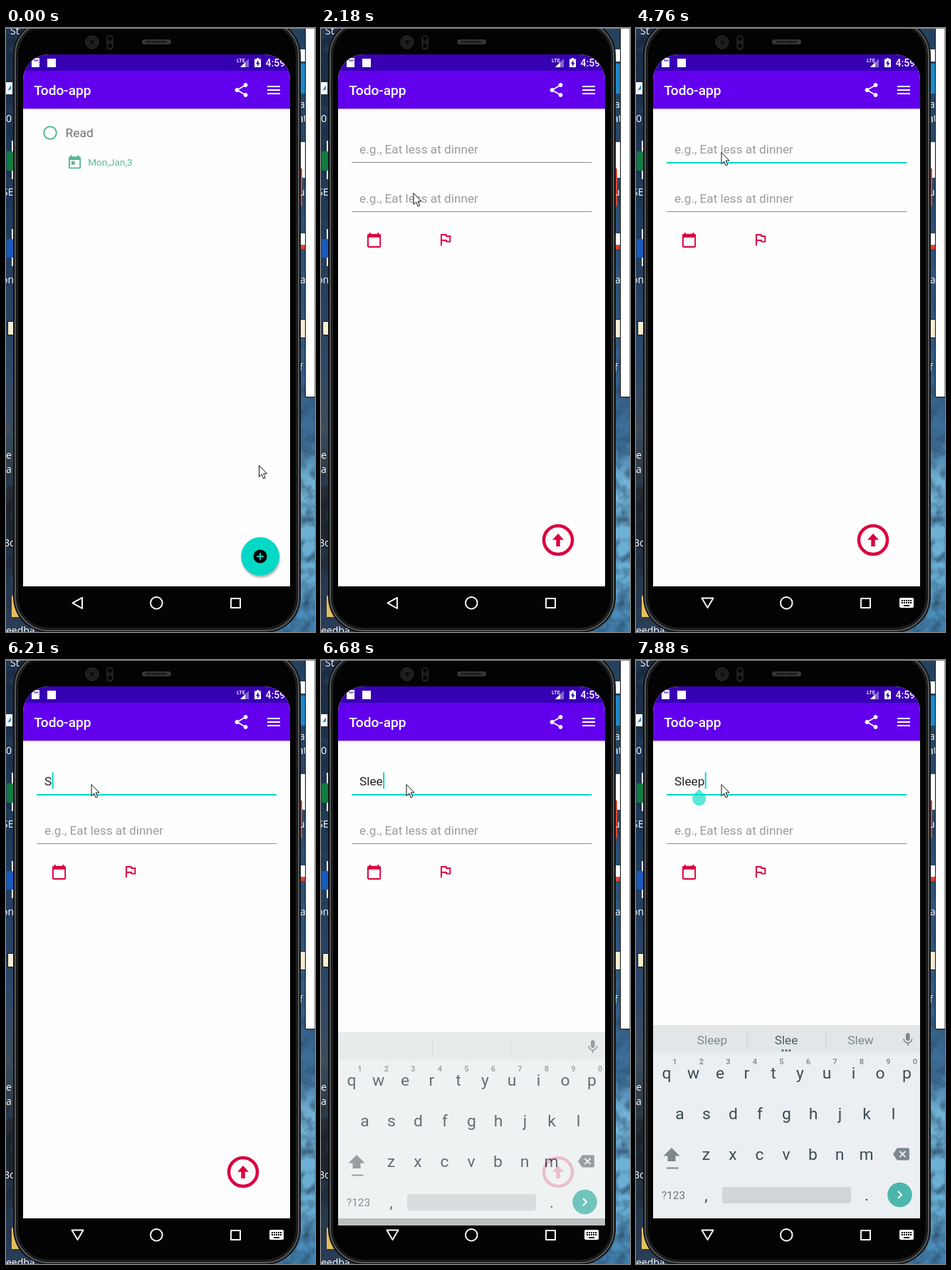
Write an HTML page that moves like this. It is 434x847 px and loops after 8 s.

```html
<!DOCTYPE html>
<html lang="en">
<head>
<meta charset="utf-8">
<title>Todo app demo</title>
<style>
  html, body { margin: 0; width: 100%; height: 100%; overflow: hidden; background: #16202c; }
  svg { display: block; font-family: Roboto, sans-serif; }
  .desk { font: 14px "Open Sans", sans-serif; fill: #fff; }
  .hint, .field { font-size: 17.2px; fill: #9b9b9b; }
  .field { fill: #222; }
  .line { fill: none; stroke: #fff; stroke-width: 1.9; stroke-linejoin: round; }
  .mid { text-anchor: middle; }
  .key { font-size: 22.9px; fill: #3c4b53; }
  .digit { font-size: 11px; font-weight: 700; fill: #87939a; }
  .word { font-size: 17.2px; fill: #7d898f; }
</style>
</head>
<body>
<svg width="434" height="847" viewBox="0 0 434 847">
  <defs>
    <linearGradient id="rock" x2="0" y2="1">
      <stop stop-color="#1a2a40"/><stop offset=".3" stop-color="#1c3555"/>
      <stop offset=".56" stop-color="#30486b"/><stop offset=".67" stop-color="#454e58"/>
      <stop offset=".8" stop-color="#1b1f26"/><stop offset="1" stop-color="#2b3d57"/>
    </linearGradient>
    <linearGradient id="sea" x2="0" y2="1">
      <stop stop-color="#23405e"/><stop offset=".6" stop-color="#35628c"/>
      <stop offset=".69" stop-color="#40749f"/><stop offset=".75" stop-color="#73b3d6"/>
      <stop offset=".9" stop-color="#68aed4"/><stop offset="1" stop-color="#3f7fae"/>
    </linearGradient>
    <linearGradient id="shade" x2="0" y2="1">
      <stop stop-color="#aaa"/><stop offset="1" stop-color="#fefefe"/>
    </linearGradient>
    <filter id="grain" x="0" y="0" width="1" height="1">
      <feTurbulence type="fractalNoise" baseFrequency=".06" numOctaves="3" seed="4"/>
      <feColorMatrix values="0 0 0 0 .02  0 0 0 0 .06  0 0 0 0 .12  1.6 0 0 0 -.6"/>
    </filter>
    <clipPath id="screen"><path d="M24 783V73a36 36 0 0 1 36-36H363a36 36 0 0 1 36 36V783z"/></clipPath>
  </defs>

  <!-- desktop -->
  <rect width="217" height="847" fill="url(#rock)"/>
  <rect x="217" width="217" height="847" fill="url(#sea)"/>
  <rect width="434" height="847" filter="url(#grain)"/>
  <path fill="#fff" d="M0 76h9v17H0zM8 158h2v54H8zM8 282h2v52H8zM412 30h9v17h-9zM412 160h9v50h-9zM412 288h9v16h-9z"/>
  <path fill="#1f88c8" d="M2 88l5-8v6zM412 50h9v42h-9z"/>
  <path fill="#107c41" d="M1 173h9v27H1z"/>
  <path fill="#185abd" d="M1 296h9v26H1z"/>
  <path fill="#e0452f" d="M412 197h4v53h-4zM412 304h9v6h-9z"/>
  <path fill="#f4edd0" stroke="#111" d="M2.500 411.500h9v19h-9zM412.500 408.500h9v26h-9z"/>
  <path fill="#e6c05c" d="M8 795l12 14v17H8z"/>
  <g class="desk">
    <text x="6" y="9">St</text><text x="0" y="132">0</text><text x="-5" y="235">SE</text>
    <text x="-6" y="358">on</text><text x="0" y="604">e</text><text x="0" y="624">a</text>
    <text x="-4" y="727">Bo</text><text x="0" y="850">eedba</text>
    <text x="412" y="112">a</text><text x="410" y="132">at</text><text x="411" y="235">u</text>
    <text x="413" y="358">a</text><text x="412" y="481">f</text>
  </g>
  <path fill="#fff" stroke="#111" d="M420.500-1V517.500H435V-1z"/>
  <path stroke="#999" d="M433.500 0V517"/>

  <!-- phone -->
  <rect x="10" y="-12" width="404" height="860" rx="50" fill="#0f1011"/>
  <rect x="13" y="-9" width="398" height="854" rx="47" fill="none" stroke="#58595b" stroke-width="2"/>
  <rect x="15" y="-7" width="394" height="850" rx="45" fill="#1e1f20"/>
  <rect x="17" y="-5" width="390" height="846" rx="43" fill="#030303"/>
  <circle cx="121" cy="20" r="9" fill="#1b1b1c" stroke="#333"/>
  <circle cx="121" cy="20" r="4" fill="#0d0e12" stroke="#2c2d30"/>
  <rect x="141" y="10" width="10" height="21" rx="5" fill="#1f1f20"/>
  <path d="M146 15v0M146 25v0" stroke="#050505" stroke-width="6" stroke-linecap="round"/>
  <rect x="191" y="16" width="41" height="7" rx="3.5" fill="#363637"/>
  <path d="M197 19.5h29" stroke="#161616" stroke-width="3" stroke-dasharray="3 1"/>
  <path stroke="#8a8a8a" d="M0 .5H434"/>

  <g clip-path="url(#screen)">
    <rect x="24" y="37" width="375" height="746" fill="#fefefe"/>
    <rect x="24" y="113" width="375" height="2" fill="url(#shade)"/>
    <rect x="24" y="37" width="375" height="23" fill="#3700b3"/>
    <rect x="24" y="60" width="375" height="53" fill="#6200ee"/>
    <g fill="#fff">
      <path d="M40 42h7v13H36V46z"/>
      <path d="M40.5 44v3M42.7 44v3M44.9 44v3" stroke="#3700b3"/>
      <rect x="58" y="43" width="12" height="12"/>
      <text x="324" y="47.5" font-size="7.5" font-weight="500">LTE</text>
      <path d="M341 43v12h-12z" opacity=".4"/><path d="M336 48v7h-7z"/>
      <path d="M352 42h3v1.5h3V55h-9V43.5h3z"/>
      <path d="M354.5 45l-3.5 5h2v4l3.5-5h-2z" fill="#3700b3"/>
      <text x="364.5" y="53.5" font-size="14" font-weight="500">4:59</text>
      <text x="39.2" y="94" font-size="19.1" font-weight="500">Todo-app</text>
      <path transform="translate(318.5 75)" d="M18 16.08c-.76 0-1.44.3-1.96.77L8.91 12.7c.05-.23.09-.46.09-.7s-.04-.47-.09-.7l7.05-4.11c.54.5 1.25.81 2.04.81 1.66 0 3-1.34 3-3s-1.34-3-3-3-3 1.34-3 3c0 .24.04.47.09.7L8.04 9.81C7.5 9.31 6.79 9 6 9c-1.66 0-3 1.34-3 3s1.34 3 3 3c.79 0 1.5-.31 2.04-.81l7.12 4.16c-.05.21-.08.43-.08.65 0 1.61 1.31 2.92 2.92 2.92s2.92-1.31 2.92-2.92-1.31-2.92-2.92-2.92z"/>
      <path d="M367 81h18v2h-18zM367 86h18v2h-18zM367 91h18v2h-18z"/>
    </g>

    <g id="list">
      <circle cx="62" cy="147" r="8.8" fill="none" stroke="#55b89a" stroke-width="2"/>
      <text x="83.5" y="153" font-size="17.4" fill="#717171">Read</text>
      <path transform="translate(85.1 177.3) scale(.955)" fill="#55b89a" d="M19 3h-1V1h-2v2H8V1H6v2H5c-1.11 0-2 .9-2 2v14c0 1.1.89 2 2 2h14c1.1 0 2-.9 2-2V5c0-1.1-.9-2-2-2zm0 16H5V8h14v11zM7 10h5v5H7z"/>
      <text x="115.2" y="193" font-size="13.6" fill="#55b89a">Mon,Jan,3</text>
      <circle id="fab" cx="357" cy="741" r="27"/>
      <circle cx="357" cy="741" r="9.6"/>
      <path d="M357 736.2v9.6M352.2 741h9.6" stroke="#06d4c3" stroke-width="2"/>
    </g>

    <g id="form">
      <text id="hint" class="hint" x="54.1" y="176">e.g., Eat less at dinner</text>
      <text class="hint" x="54.1" y="245">e.g., Eat less at dinner</text>
      <rect id="underline" x="43" y="188" width="337"/>
      <rect x="43" y="257" width="337" height="1" fill="#8c8c8c"/>
      <g fill="#da0040">
        <path transform="translate(63.1 286) scale(.955)" d="M20 3h-1V1h-2v2H7V1H5v2H4c-1.1 0-2 .9-2 2v16c0 1.1.9 2 2 2h16c1.1 0 2-.9 2-2V5c0-1.1-.9-2-2-2zm0 18H4V8h16z"/>
        <path transform="translate(163.2 285.3) scale(.955)" d="M12.36 6l.4 2H18v6h-3.36l-.4-2H7V6h5.36M14 4H5v17h2v-7h5.6l.4 2h7V6h-5.6z"/>
        <circle cx="333" cy="718" r="20" fill="none" stroke="#da0040" stroke-width="4.5"/>
        <path d="M333 709l8 8.7h-5.3v9.3h-5.4v-9.3h-5.3z"/>
      </g>
      <text id="typed" class="field" x="54.1" y="176"></text>
      <rect id="caret" y="157.5" width="2" height="23" fill="#03dac5"/>
      <path id="handle" fill="#03dac5" d="M88.7 181l7 7a9.6 9.6 0 1 1-14 0z"/>
    </g>
  </g>

  <!-- navigation bar -->
  <path id="back" class="line"/>
  <circle class="line" cx="211.3" cy="806.3" r="8.3"/>
  <rect class="line" x="316" y="800" width="13" height="13"/>
  <path id="imeIcon" fill="#fff" fill-rule="evenodd" d="M372 799h16a2 2 0 0 1 2 2v10a2 2 0 0 1-2 2h-16a2 2 0 0 1-2-2v-10a2 2 0 0 1 2-2zm1 3h2v2h-2zm3 0h2v2h-2zm3 0h2v2h-2zm3 0h2v2h-2zm3 0h2v2h-2zm-12 3h2v2h-2zm3 0h2v2h-2zm3 0h2v2h-2zm3 0h2v2h-2zm3 0h2v2h-2zm-9 4h8v2h-8z"/>

  <g id="keyboard">
    <rect x="24" y="512" width="375" height="271" fill="#eceff1"/>
    <rect x="24" y="512" width="375" height="38.5" fill="#e2e6e8"/>
    <path d="M156.5 521v23M266.5 521v23" stroke="#cbd0d3"/>
    <g fill="#7d888d">
      <path transform="translate(370.5 521) scale(.94)" d="M12 14c1.66 0 3-1.34 3-3V5c0-1.66-1.34-3-3-3S9 3.34 9 5v6c0 1.66 1.34 3 3 3zm5.3-3c0 3-2.54 5.1-5.3 5.1S6.7 14 6.7 11H5c0 3.41 2.72 6.23 6 6.72V21h2v-3.28c3.28-.48 6-3.3 6-6.72z"/>
      <path d="M50 684l11.5 11.5H55.5V703h-11v-7.5H38.5zM43 711.5h16.5v2H43z"/>
      <path transform="translate(361 681.5) scale(.955)" d="M22 3H7c-.69 0-1.23.35-1.59.88L0 12l5.41 8.11c.36.53.9.89 1.59.89h15c1.1 0 2-.9 2-2V5c0-1.1-.9-2-2-2zm-3 12.59L17.59 17 14 13.41 10.41 17 9 15.59 12.59 12 9 8.41 10.41 7 14 10.59 17.59 7 19 8.41 15.41 12z"/>
    </g>
    <rect x="121" y="739" width="181" height="23" rx="3" fill="#d0d5d8"/>
    <text x="36" y="756" font-size="15.3" fill="#66747b">?123</text>
    <circle cx="370.5" cy="750" r="17.3" fill="#4db6ac"/>
    <path class="line" d="M368 745l5 5-5 5"/>
    <g id="keys"></g>
    <g id="words">
      <text class="word mid" x="107" y="539">Sleep</text>
      <text class="word mid" x="211" y="539" style="fill:#4f5f67">Slee</text>
      <text class="word mid" x="315.5" y="539">Slew</text>
      <path d="M206 547.5v0M211 547.5v0M216 547.5v0" stroke="#455a64" stroke-width="3" stroke-linecap="round"/>
    </g>
  </g>

  <path id="pointer" fill="#fff" stroke="#111" d="M.5.5V16.5L4.2 13l2.5 6 2.5-1.1L6.7 12H11.5z"/>
</svg>

<script>
const LOOP = 8000;
const $ = id => document.getElementById(id);
const set = (id, attrs) => {
  for (const name in attrs) $(id).setAttribute(name, attrs[name]);
};

const addKeys = (chars, x, y, className) => {
  [...chars].forEach((char, i) => {
    $('keys').innerHTML += `<text class="${className} mid" x="${x + 37.5 * i}" y="${y}">${char}</text>`;
  });
};
addKeys('qwertyuiop', 43, 587, 'key');
addKeys('1234567890', 54.5, 567, 'digit');
addKeys('asdfghjkl', 61.5, 644, 'key');
addKeys('zxcvbnm', 98.5, 701, 'key');
addKeys(',', 98.5, 758, 'key');
addKeys('.', 324, 758, 'key');

// Each track holds [start time, ...values]; values jump at the start time.
const pointerTrack = [
  [0, 355, 613], [140, 347, 645], [260, 341, 669], [540, 346, 692], [670, 354, 718],
  [810, 356, 730], [940, 356.5, 738.5], [1910, 262, 562], [2030, 159, 373], [2180, 129.5, 231],
  [2310, 127, 216], [2610, 125, 209], [2760, 122, 194], [2890, 119, 176], [3040, 119.5, 174]
];
const formTrack = [[0, 0], [1330, .5], [1460, 1]];
const typedTrack = [[0, ''], [6210, 'S'], [6530, 'Slee'], [7880, 'Sleep']];
const keyboardTrack = [[0, 0, 0], [6530, .45, 18], [6680, .8, 10], [6830, .95, 5], [6990, 1, 0]];
const handleTrack = [[0, 0], [6990, 1], [7880, .65]];
const caretToggles = [3440, 3890, 4320, 4760, 5940, 6070, 6210, 7440, 7880];

const at = (track, time) => track.filter(step => step[0] <= time).pop().slice(1);

function draw(time) {
  const [form] = at(formTrack, time);
  const [typed] = at(typedTrack, time);
  const [keyboard, drop] = at(keyboardTrack, time);
  const pressed = time >= 1190;
  const focused = time >= 3170;
  const imeOpen = time >= 4760;

  set('list', { opacity: 1 - form });
  set('form', { opacity: form });
  set('fab', {
    fill: pressed ? '#0bcbbb' : '#06d8c6',
    style: `filter: drop-shadow(${pressed ? '0 6px 5px #0004' : '1px 3.5px .8px #0004'})`
  });
  set('underline', focused ? { height: 2, fill: '#03dac5' } : { height: 1, fill: '#8c8c8c' });

  $('typed').textContent = typed;
  set('hint', { opacity: typed ? 0 : 1 });
  set('caret', {
    x: 54.5 + (typed ? $('typed').getComputedTextLength() : 0),
    opacity: caretToggles.filter(start => start <= time).length % 2
  });
  set('handle', { opacity: at(handleTrack, time)[0] });

  set('back', { d: imeOpen ? 'M92.5 799.5H108.5L100.5 813z' : 'M93.5 806.3L107 798.8V814z' });
  set('imeIcon', { opacity: imeOpen ? 1 : 0 });
  set('keyboard', { opacity: keyboard, transform: `translate(0 ${drop})` });
  set('words', { opacity: time >= 6990 ? 1 : 0 });
  set('pointer', { transform: `translate(${at(pointerTrack, time)})` });
}

const start = performance.now();
function tick() {
  draw((performance.now() - start) % LOOP);
  requestAnimationFrame(tick);
}
tick();
</script>
</body>
</html>
```
